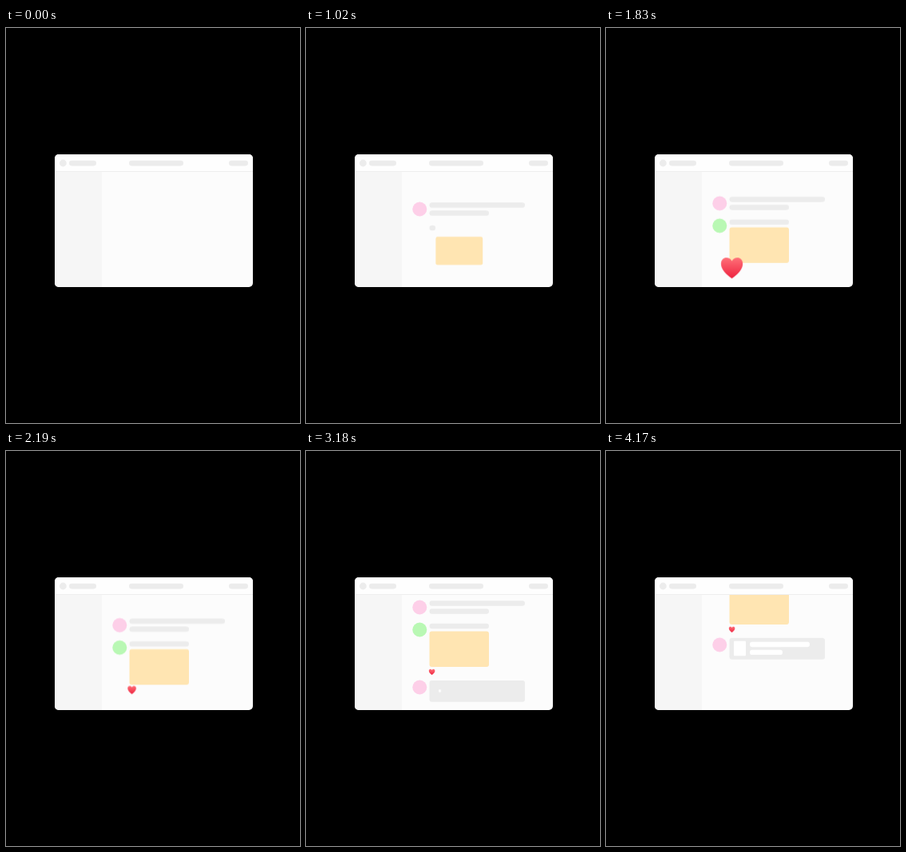
Animation of 368x494 px, one loop 4200 ms. Source, as an HTML page:

```html
<!DOCTYPE html>
<html lang="en">
<head>
<meta charset="utf-8">
<title>Chat window</title>
<style>
  html, body { margin: 0; width: 100%; height: 100%; overflow: hidden; background: #000; }
  svg { display: block; width: 368px; height: 494px; }

  .bar { fill: #ececec; }
  .white { fill: #fff; }
  .pink { fill: #fdcfe8; }
  .green { fill: #b9f8b4; }
  .yellow { fill: #ffe5b2; }

  /* Every track shares one 4200 ms cycle. */
  .move { animation: 4200ms linear infinite; }
  .pop { transform-box: fill-box; transform-origin: center; }

  #feed { animation-name: feed; }
  #avatar1 { animation-name: avatar1; }
  #line1 { animation-name: line1; }
  #line2 { animation-name: line2; }
  #avatar2 { animation-name: avatar2; }
  #line3 { animation-name: line3; }
  #image { animation-name: image; }
  #heart { animation-name: heart; }
  #avatar3 { animation-name: avatar3; }
  #bubble { animation-name: bubble, unfurl; }
  #url { animation-name: url, url-fade; }
  #thumb { animation-name: thumb; }
  #title { animation-name: title; }
  #note { animation-name: note; }

  @keyframes feed {
    0% { transform: translateY(106.5px); }
    9.29% { transform: translateY(106.5px); animation-timing-function: ease-in-out; }
    13.93% { transform: translateY(96.3px); }
    15.95% { transform: translateY(96.3px); animation-timing-function: ease-in-out; }
    26.67% { transform: translateY(23.8px); }
    51.43% { transform: translateY(23.8px); animation-timing-function: ease-in-out; }
    55.71% { transform: translateY(0); }
    93.21% { transform: translateY(0); animation-timing-function: ease-in; }
    100% { transform: translateY(-63.5px); }
  }

  @keyframes avatar1 {
    0% { transform: scale(0); }
    3.33% { transform: scale(0); animation-timing-function: ease; }
    6.57% { transform: scale(1.1); animation-timing-function: ease-in-out; }
    11.43%, 100% { transform: scale(1); }
  }
  @keyframes avatar2 {
    0% { transform: scale(0); }
    29.76% { transform: scale(0); animation-timing-function: ease; }
    33.1% { transform: scale(1.1); animation-timing-function: ease-in-out; }
    37.86%, 100% { transform: scale(1); }
  }
  @keyframes avatar3 {
    0% { transform: scale(0); }
    57.14% { transform: scale(0); animation-timing-function: ease; }
    60.48% { transform: scale(1.1); animation-timing-function: ease-in-out; }
    65.24%, 100% { transform: scale(1); }
  }
  @keyframes image {
    0% { transform: scale(0); }
    20.95% { transform: scale(0); animation-timing-function: ease; }
    28.93% { transform: scale(1.11); animation-timing-function: ease-in-out; }
    35.71%, 100% { transform: scale(1); }
  }
  @keyframes heart {
    0% { transform: scale(0); }
    38.57% { transform: scale(0); animation-timing-function: ease; }
    42.86% { transform: scale(3.6); animation-timing-function: ease-in-out; }
    55.71%, 100% { transform: scale(1); }
  }
  @keyframes thumb {
    0% { transform: scale(0); }
    75% { transform: scale(0); animation-timing-function: ease; }
    80%, 100% { transform: scale(1); }
  }

  @keyframes line1 {
    0% { width: 0; }
    4.76% { width: 0; animation-timing-function: ease; }
    14.76%, 100% { width: 119.5px; }
  }
  @keyframes line2 {
    0% { width: 0; }
    10% { width: 0; animation-timing-function: ease; }
    16.19%, 100% { width: 74.5px; }
  }
  @keyframes line3 {
    0%, 23.2% { width: 0; }
    34.05%, 100% { width: 74.5px; }
  }
  @keyframes title {
    0%, 79.4% { width: 0; }
    89.29%, 100% { width: 75px; }
  }
  @keyframes note {
    0%, 79.4% { width: 0; }
    89.29%, 100% { width: 41px; }
  }

  @keyframes bubble {
    0% { width: 0; }
    56.67% { width: 0; animation-timing-function: ease; }
    66.67%, 100% { width: 119.5px; }
  }
  @keyframes unfurl {
    0% { y: 289.7px; height: 12px; }
    71.43% { y: 289.7px; height: 12px; animation-timing-function: ease-in-out; }
    75.71%, 100% { y: 287px; height: 26.7px; }
  }
  @keyframes url {
    0%, 59.14% { width: 0; }
    69.05%, 100% { width: 105px; }
  }
  @keyframes url-fade {
    0%, 71.43% { opacity: 1; }
    73.8%, 100% { opacity: 0; }
  }
</style>
</head>
<body>
<svg viewBox="0 0 368 494">
  <defs>
    <clipPath id="frame"><rect x="61" y="158" width="248" height="166" rx="5"/></clipPath>
    <clipPath id="pane"><rect x="120" y="180" width="189" height="144"/></clipPath>
    <linearGradient id="red" x1="0" y1="0" x2="0" y2="1">
      <stop offset="0" stop-color="#ff7078"/>
      <stop offset="1" stop-color="#ee2340"/>
    </linearGradient>
  </defs>

  <g clip-path="url(#frame)">
    <rect x="61" y="158" width="248" height="166" fill="#fcfcfc"/>
    <rect x="61" y="180" width="59" height="144" fill="#f6f6f6"/>
    <rect x="61" y="158" width="248" height="21" fill="#fefefe"/>
    <rect x="61" y="179" width="248" height="1" fill="#eeeeee"/>
    <circle class="bar" cx="71.4" cy="169" r="4.4"/>
    <rect class="bar" x="79" y="165.8" width="34" height="6.6" rx="3.3"/>
    <rect class="bar" x="154" y="165.8" width="68" height="6.6" rx="3.3"/>
    <rect class="bar" x="279" y="165.8" width="24" height="6.6" rx="3.3"/>

    <g clip-path="url(#pane)">
      <g id="feed" class="move">
        <circle id="avatar1" class="move pop pink" cx="142.3" cy="195.5" r="9"/>
        <rect id="line1" class="move bar" x="154.5" y="187.2" height="6.6" rx="3.3"/>
        <rect id="line2" class="move bar" x="154.5" y="197.2" height="6.6" rx="3.3"/>

        <circle id="avatar2" class="move pop green" cx="142.3" cy="223.5" r="9"/>
        <rect id="line3" class="move bar" x="154.5" y="215.7" height="6.6" rx="3.3"/>
        <rect id="image" class="move pop yellow" x="154.5" y="225.4" width="74.5" height="44.6" rx="3"/>
        <path id="heart" class="move pop" fill="url(#red)"
          d="M157.6 280.1C155.8 278.8 153.8 277.1 153.8 275C153.8 272.5 156.6 272.2 157.6 274C158.6 272.2 161.4 272.5 161.4 275C161.4 277.1 159.4 278.8 157.6 280.1Z"/>

        <circle id="avatar3" class="move pop pink" cx="142.3" cy="295.5" r="9"/>
        <rect id="bubble" class="move bar" x="154.5" rx="3"/>
        <rect id="url" class="move" x="160" y="294.9" height="1.2" rx=".6" fill="#d2d2d2"/>
        <rect id="thumb" class="move pop white" x="160" y="290.7" width="15" height="18.5" rx="1"/>
        <rect id="title" class="move white" x="180" y="291.8" height="6.4" rx="3.2"/>
        <rect id="note" class="move white" x="180" y="301.7" height="6.4" rx="3.2"/>
      </g>
    </g>
  </g>
</svg>
</body>
</html>
```
